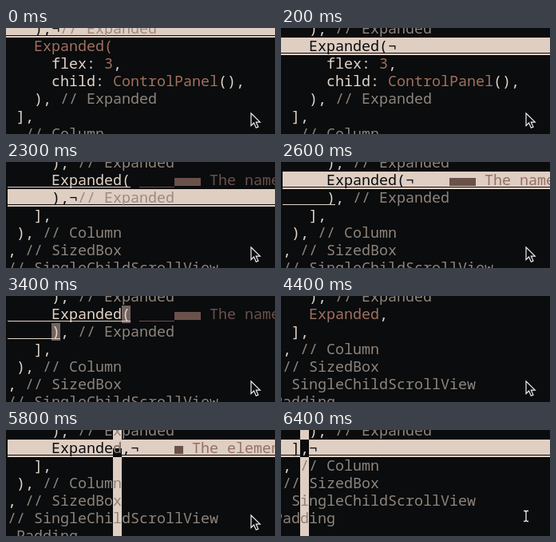
Recreate the animation shown at these times as an HTML page. Size 337 px wide and 133 px high, loop 6.5 s.

```html
<!DOCTYPE html>
<html lang="en">
<head>
<meta charset="utf-8">
<title>Editor</title>
<style>
  html, body { margin: 0; width: 100%; height: 100%; overflow: hidden; background: #0a0c0d; }
  svg { display: block; width: 337px; height: 133px; }
  text { font: 18.333px "Noto Sans Mono", "DejaVu Sans Mono", monospace; white-space: pre; }
</style>
</head>
<body>
<svg id="stage" viewBox="0 0 337 133"></svg>
<script>
const LOOP = 6500, CW = 11, RH = 22, TOP = -10;
const BG = '#0a0c0d', BAR = '#dfcec2', FG = '#e3d4c9', NAME = '#a1705f',
      LABEL = '#8f847c', DIAG = '#6b514b', MATCH = '#736360';

const stage = document.getElementById('stage');

function add(parent, tag, attrs, text) {
  const el = document.createElementNS('http://www.w3.org/2000/svg', tag);
  for (const k in attrs) el.setAttribute(k, attrs[k]);
  if (text) el.textContent = text;
  parent.append(el);
  return el;
}

// A row is a list of [column, text, colour]; "end" is the column after the code.
const row = (...parts) => ({ parts, end: parts.length ? Math.max(...parts
  .filter(p => p[2] !== LABEL).map(p => p[0] + p[1].length)) : 0 });
const close = (col, name) => row([col, '),', FG], [col + 3, '// ' + name, LABEL]);

const inner = close(5, 'Expanded');
const open = row([5, 'Expanded(', NAME]);
const openError = row([5, 'Expanded(', FG]);
const bare = row([5, 'Expanded', NAME]);
const single = row([5, 'Expanded', NAME], [13, ',', FG]);
const singleError = row([5, 'Expanded,', FG]);
const flex = row([7, 'flex: ', FG], [13, '3', NAME], [14, ',', FG]);
const child = row([7, 'child: ', FG], [14, 'ControlPanel', NAME], [26, '(),', FG]);
const list = row([3, '],', FG]);
const tail = [list, close(1, 'Column'), close(-1, 'SizedBox'),
  close(-3, 'SingleChildScrollView'), close(-5, 'Padding')];

const full = [inner, open, flex, child, inner, ...tail];
const empty = [inner, openError, inner, ...tail];
const joined = [inner, singleError, ...tail];
const named = { blocks: 3, text: 'The named' };
const element = { blocks: 1, text: 'The element' };
const broken = { signs: true, rows: empty, diag: named, errors: [[1, 14], [2, 6]] };
const onParen = { ...broken, line: 1, col: 13, match: [[2, 5]] };
const onName = { signs: true, rows: joined, diag: element, line: 1, col: 12 };
const onList = { rows: [inner, ...tail], line: 1, col: 4 };

const steps = [
  [0,    { rows: full, line: 0 }],
  [200,  { rows: full, line: 1 }],
  [2000, { rows: full, line: 2 }],
  [2300, { ...broken, line: 2 }],
  [2600, { ...broken, line: 1 }],
  [3000, onParen],
  [3200, { ...onParen, beam: true }],
  [3400, { ...broken, match: [[1, 13], [2, 5]] }],
  [4200, { rows: [inner, bare, inner, ...tail] }],
  [4400, { rows: [inner, single, ...tail] }],
  [5100, onName],
  [5800, { ...onName, pending: true }],
  [6100, onList],
  [6400, { ...onList, beam: true }]
];

function drawPointer(g, beam) {
  if (beam) {
    const d = 'M304 101.5h2l1 1 1-1h2M307 102v12M304 114.5h2l1-1 1 1h2';
    add(g, 'path', { d, fill: 'none', stroke: '#000', 'stroke-width': 3 });
    add(g, 'path', { d, fill: 'none', stroke: '#f4f4f4', 'stroke-width': 1.3 });
  } else {
    add(g, 'path', { d: 'M307 107v15.5l3.6-3.4 2.7 6.2 2.7-1.2-2.7-6h5z',
      fill: '#0c0c0c', stroke: '#eee', 'stroke-width': 1.2 });
  }
}

function drawState(s) {
  const g = add(stage, 'g', { visibility: 'hidden' });
  const left = s.signs ? 2 : -20;
  const x = c => left + c * CW, y = r => TOP + r * RH;
  const box = (px, py, width, height, fill) =>
    add(g, 'rect', { x: px, y: py, width, height, fill });
  const write = (c, r, text, fill) =>
    add(g, 'text', { x: x(c), y: y(r) + 16.5, fill }, text);
  const hasCol = s.col !== undefined;

  if (hasCol) box(x(s.col), 0, CW, 133, BAR);
  if (s.line !== undefined) {
    box(left, y(s.line), 337 - left, RH, BAR);
    box(left, y(s.line) + 19, 337 - left, 1, BG);
  }
  for (const [r, c] of s.match || []) box(x(c), y(r), CW, RH, MATCH);
  for (const [r, end] of s.errors || [])
    if (r !== s.line) box(left, y(r) + 19, end * CW, 1, FG);

  s.rows.slice(0, 7).forEach((line, r) => {
    const lit = r === s.line;
    for (const [c, text, fill] of line.parts)
      write(c, r, text, !lit ? fill : fill === LABEL ? '#9b8a80' : BG);
    if (lit) write(line.end, r, '¬', BG);
  });

  if (s.diag) {
    const n = s.diag.blocks;
    if (s.line !== 1) box(x(15), y(1) + 19, 4 * CW, 1, DIAG);
    box(x(19), y(1) + 8, n * CW, 10, DIAG);
    write(20 + n, 1, s.diag.text, s.line === 1 ? '#957067' : DIAG);
  }

  if (hasCol) {
    const half = s.pending ? RH / 2 : 0;
    box(x(s.col), y(s.line) + half, CW, RH - half, BG);
    const part = s.rows[s.line].parts.find(p => s.col >= p[0] && s.col < p[0] + p[1].length);
    write(s.col, s.line, part[1][s.col - part[0]], s.pending ? LABEL : FG);
  }
  if (s.signs) box(0, 0, left, 133, BG);
  drawPointer(g, s.beam);
  return g;
}

const views = steps.map(([, s]) => drawState(s));
const start = performance.now();
let shown = -1;

function tick() {
  const t = (performance.now() - start) % LOOP;
  const now = steps.findLastIndex(([at]) => at <= t);
  if (now !== shown) {
    views.forEach((v, i) => v.setAttribute('visibility', i === now ? 'visible' : 'hidden'));
    shown = now;
  }
  requestAnimationFrame(tick);
}
tick();
</script>
</body>
</html>
```
